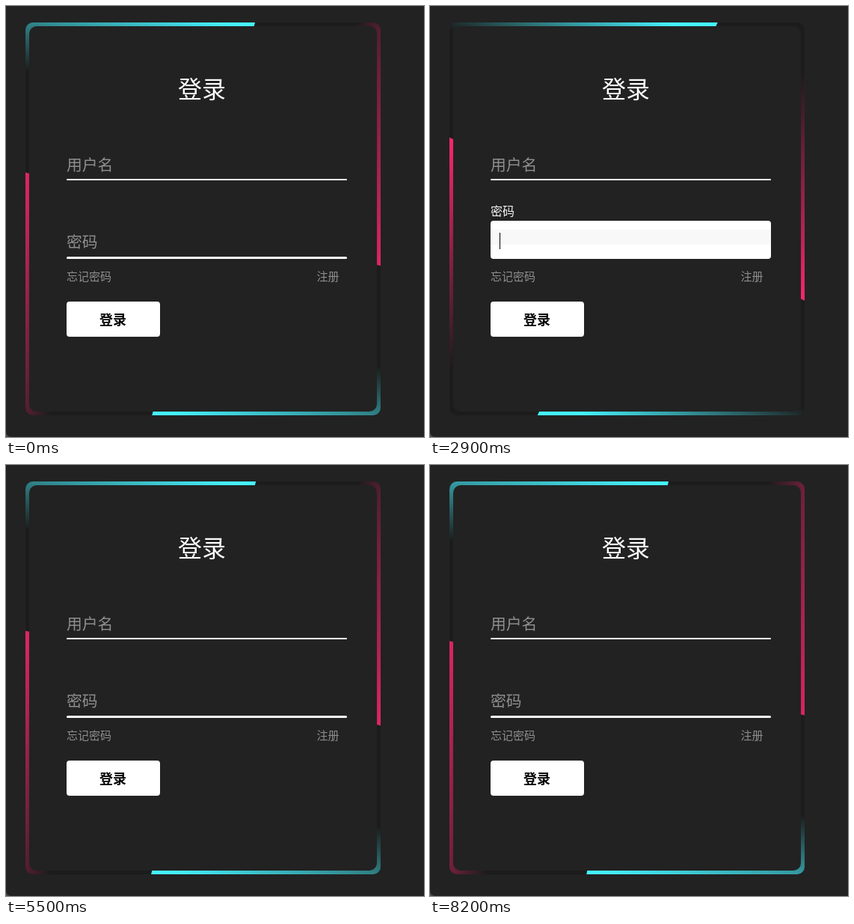
An HTML page for the animation above (8300 ms loop, 559 by 576 pixels).

```html
<!DOCTYPE html>
<html lang="zh-CN">
<head>
<meta charset="utf-8">
<title>登录</title>
<style>
  html, body { margin: 0; width: 100%; height: 100%; overflow: hidden; background: #4a4a4a; }
  .stage {
    position: relative; width: 559px; height: 576px; overflow: hidden;
    background: #222; border-bottom-left-radius: 7px;
    font-family: "Noto Sans CJK SC", "Noto Sans CJK", sans-serif;
  }
  .stage * { position: absolute; }
  .card {
    left: 26px; top: 22px; width: 475px; height: 525px;
    border-radius: 10px; overflow: hidden; background: #1c1c1c;
  }
  .beam {
    right: 50%; bottom: 50%; width: 100%; height: 100%;
    transform-origin: 100% 100%;
    background: linear-gradient(0deg, transparent 25%, var(--glow) 50%);
  }
  .panel { inset: 5px; border-radius: 10px; background: #222; }
  .text {
    left: 81px; line-height: 1; white-space: nowrap; color: #8f8f8f;
    transform: translateY(calc(-50% - .056em));
  }
  .title { left: 230px; top: 111px; font-size: 32px; color: #fff; }
  .link { top: 361px; font-size: 15px; }
  .fill { left: 81px; width: 375px; border-radius: 4px; }
  .caret { left: 93px; width: 1px; height: 22px; background: #000; }
  .button { left: 81px; top: 395px; width: 125px; height: 47px; border-radius: 4px; background: #fff; }
  .button .text { left: 44px; top: 24px; font-size: 18px; font-weight: bold; color: #000; }
</style>
</head>
<body>
<div class="stage">
  <div class="card">
    <div class="beam" style="--glow:#45f3ff"></div>
    <div class="beam" style="--glow:#ff2770"></div>
    <div class="beam" style="--glow:#45f3ff"></div>
    <div class="beam" style="--glow:#ff2770"></div>
    <div class="panel"></div>
  </div>
  <div class="text title">登录</div>
  <div class="text link" id="forgot">忘记密码</div>
  <div class="text link" style="left:415.5px">注册</div>
  <div class="button"><div class="text">登录</div></div>
</div>
<script>
const LOOP = 8300, STEP = 100, TRANSITION = 460, BLINK = 486;
const stage = document.querySelector('.stage');
const beams = document.querySelectorAll('.beam');
const forgot = document.getElementById('forgot');

const add = (className, text = '') => {
  const el = document.createElement('div');
  el.className = className;
  el.textContent = text;
  return stage.appendChild(el);
};

const makeField = (name, settings) => {
  const field = { ...settings, fill: add('fill'), label: add('text', name), caret: add('caret') };
  field.fill.style.background = `linear-gradient(to top, ${field.shade})`;
  field.caret.style.top = field.bottom - 35 + 'px';
  return field;
};

const fields = [
  makeField('用户名', { bottom: 233, line: 2, labelY: 213, focus: 574, blur: 2300,
    shade: '#fff 4px, #f9f9f9 4px' }),
  makeField('密码', { bottom: 338, line: 3, labelY: 316, focus: 2596, blur: 4000,
    shade: '#fff 19px, #f8f8f8 19px 39px, #fff 39px' })
];

const mix = (a, b, p) => a + (b - a) * p;

// CSS "ease": cubic-bezier(.25, .1, .25, 1)
const bezier = (a, b, s) => 3 * a * s * (1 - s) ** 2 + 3 * b * s * s * (1 - s) + s ** 3;
const ease = x => {
  if (x <= 0) return 0;
  if (x >= 1) return 1;
  let low = 0, high = 1;
  for (let i = 0; i < 20; i++) {
    const mid = (low + high) / 2;
    if (bezier(.25, .25, mid) < x) low = mid; else high = mid;
  }
  return bezier(.1, 1, low);
};

function drawField({ fill, label, caret, bottom, line, labelY, focus, blur }, t) {
  const p = ease((t - focus) / TRANSITION) - ease((t - blur) / TRANSITION);
  const height = mix(line, 55, p);
  const grey = mix(143, 255, p);
  fill.style.top = bottom - height + 'px';
  fill.style.height = height + 'px';
  label.style.top = mix(labelY, labelY - 46, p) + 'px';
  label.style.fontSize = mix(20.8, 15.6, p) + 'px';
  label.style.color = `rgb(${grey}, ${grey}, ${grey})`;
  const lit = t >= focus && t < blur && Math.floor((t - focus) / BLINK) % 2 === 0;
  caret.style.visibility = lit ? 'visible' : 'hidden';
}

function draw(now) {
  const tick = Math.floor(now % LOOP / STEP), t = tick * STEP;
  const angle = 14.7 + 6.55 * tick;
  beams.forEach((beam, i) => beam.style.transform = `rotate(${angle + 90 * i}deg)`);
  fields.forEach(field => drawField(field, t));
  forgot.style.color = t >= 4300 && t < 5100 ? '#fff' : '';
}

const start = performance.now();
function loop() {
  draw(performance.now() - start);
  requestAnimationFrame(loop);
}
loop();
</script>
</body>
</html>
```
